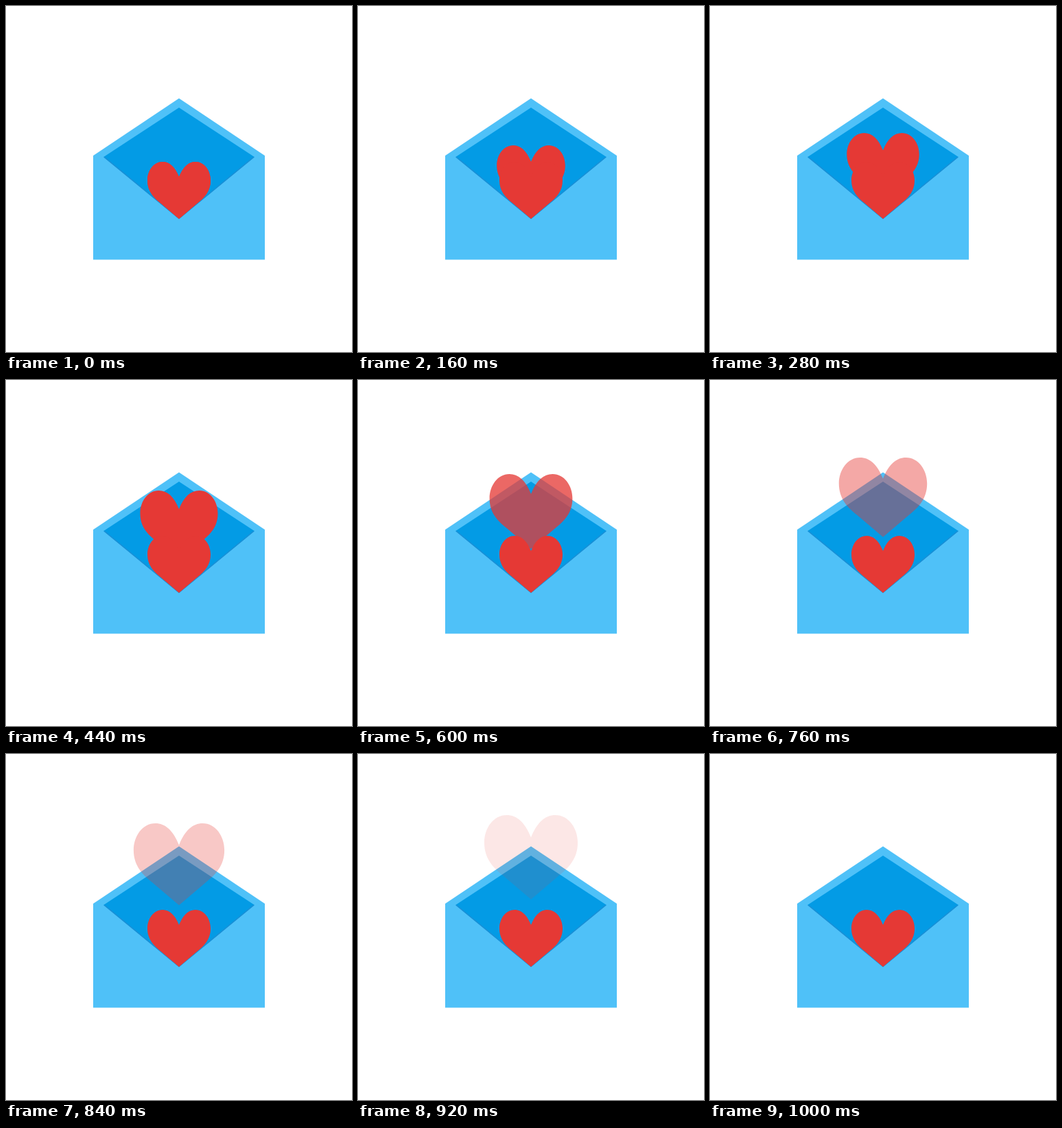
An HTML page that plays this animation: 504 px wide and 504 px high, repeating every 1040 ms.

```html
<!DOCTYPE html>
<html lang="en">
<head>
<meta charset="utf-8">
<title>Envelope with rising heart</title>
<style>
  html, body { margin: 0; height: 100%; overflow: hidden; background: #fff; }
  svg { display: block; width: 100%; height: 100%; }
</style>
</head>
<body>
<svg viewBox="0 0 504 504">
  <defs>
    <!-- origin: middle of the heart's top edge -->
    <path id="heart" fill="#e53935" d="M0 22C-6 7-14 0-24 0C-37 0-46 13-46 27C-46 43-37 52-27 60L0 83L27 60C37 52 46 43 46 27C46 13 37 0 24 0C14 0 6 7 0 22Z"/>
  </defs>
  <path fill="#4fc1f8" d="M252 134.5L377 218V369.5H127V218Z"/>
  <path fill="#039be5" d="M252 148L362 220L252 310L142 220Z"/>
  <path fill="none" stroke="#1a8fd6" stroke-width="1.5" d="M143 220L252 309.5L361 220"/>
  <use id="rising" href="#heart"/>
  <use href="#heart" transform="translate(252 227)"/>
</svg>
<script>
  const LOOP = 1040, STEP = 40, RISE_END = 960;
  const FADE_START = 480, FADE_TIME = 500;
  const rising = document.getElementById('rising');
  const clamp = v => Math.min(1, Math.max(0, v));

  function draw(now) {
    const t = Math.floor(now % LOOP / STEP) * STEP;
    const p = clamp(t / RISE_END);
    rising.setAttribute('transform', `translate(252 ${227 - 144 * p}) scale(${1 + p / 2})`);
    rising.setAttribute('opacity', t > RISE_END ? 0 : clamp(1 - (t - FADE_START) / FADE_TIME));
  }

  const start = performance.now();
  function tick() {
    draw(performance.now() - start);
    requestAnimationFrame(tick);
  }
  tick();
</script>
</body>
</html>
```
